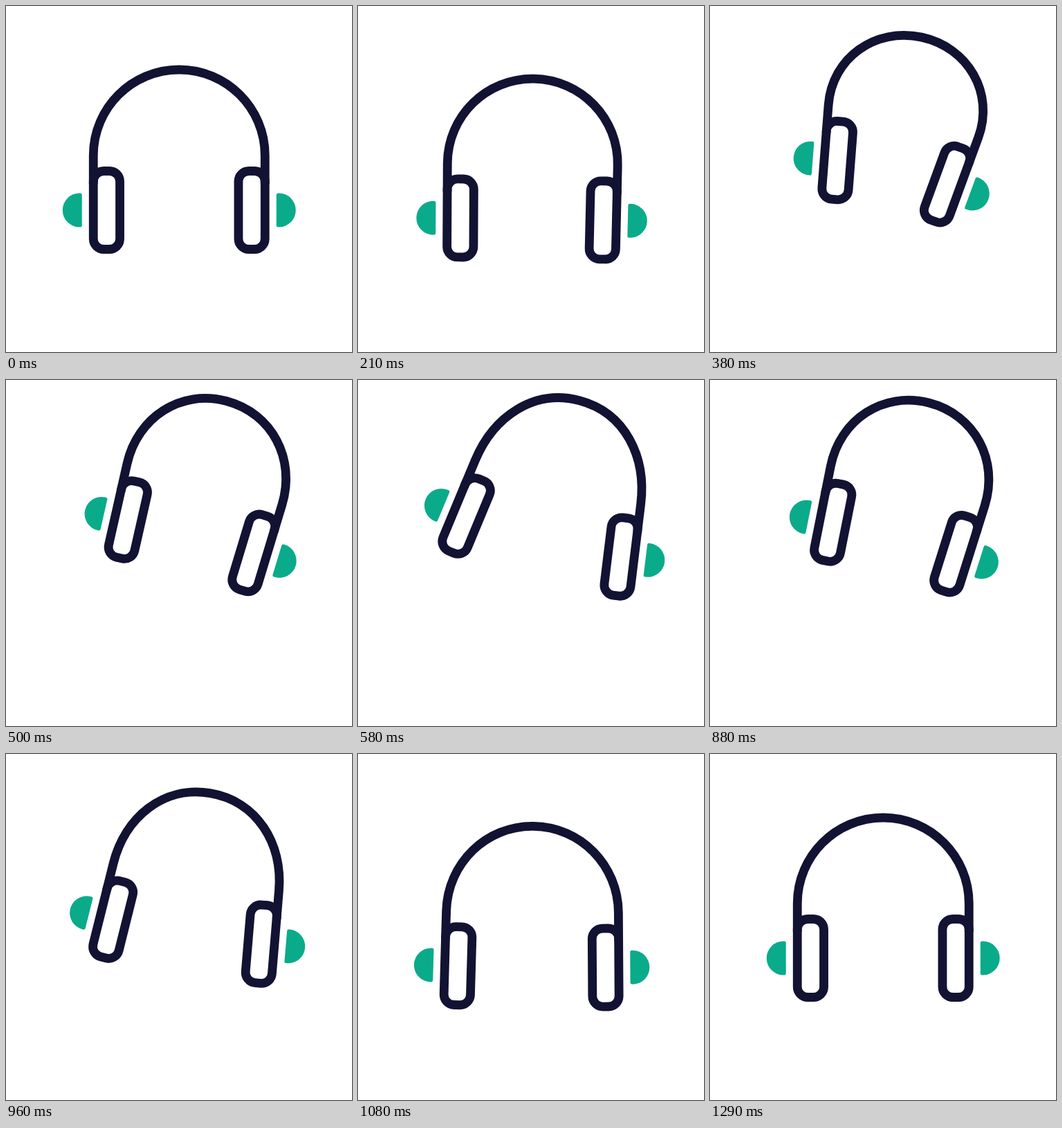
Write an HTML page that moves like this. It is 500 by 500 pixels and loops after 1.33 s.

```html
<!DOCTYPE html>
<html lang="en">
<head>
<meta charset="utf-8">
<title>Headphones</title>
<style>
  html, body { margin: 0; width: 100%; height: 100%; overflow: hidden; background: #fff; }
  svg { display: block; width: 100%; height: 100%; }
  .line { fill: none; stroke: #121233; stroke-width: 12.8; }
  .pad { fill: #0aab8a; }
</style>
</head>
<body>
<svg viewBox="0 0 500 500">
  <defs>
    <g id="cup">
      <rect class="line" x="-19" y="-56.5" width="38.3" height="113" rx="15"/>
      <path class="pad" d="M-39-24.5a24.5 24.5 0 0 0 0 49h1a2.5 2.5 0 0 0 2.5-2.5v-44a2.5 2.5 0 0 0-2.5-2.5z"/>
    </g>
  </defs>
  <g id="body">
    <path id="band" class="line"/>
    <use id="left" href="#cup"/>
    <use id="right" href="#cup"/>
  </g>
</svg>
<script>
const LOOP = 1330, STEP = 1000 / 24;
const HANDLE = 68.5; // quarter-circle handle for the band's 124 radius
const $ = id => document.getElementById(id);
const body = $('body'), band = $('band'), left = $('left'), right = $('right');

// [time in ms, value], joined by sine easing
const HEIGHT = [[0, 295], [175, 311], [449, 226], [845, 226], [1120, 311], [1290, 295]];
const TILT = [[165, 0], [453, 14.8], [845, 14.8], [1120, 0]];
const FLEX = [[170, 0], [410, -8.3], [640, 10.5], [800, -7.5], [990, 5.5], [1120, 0]];

function at(keys, t) {
  if (t <= keys[0][0]) return keys[0][1];
  for (let i = 1; i < keys.length; i++) {
    const [t0, a] = keys[i - 1], [t1, b] = keys[i];
    if (t <= t1) return a + (b - a) * (1 - Math.cos(Math.PI * (t - t0) / (t1 - t0))) / 2;
  }
  return keys[keys.length - 1][1];
}

function draw(t) {
  const tilt = at(TILT, t), flex = at(FLEX, t);
  const x = 250.25 + 1.15 * tilt + 0.13 * flex;
  const half = 105 - 6.5 * Math.min(1, tilt / 9) + 2.2 * flex;
  const top = -203 - 0.4 * Math.min(flex, 0);
  const a = flex * Math.PI / 180, c = Math.cos(a), s = Math.sin(a);

  // point on the outer side of the left cup, in body space
  const side = y => [-half - 19 * c - y * s, -19 * s + y * c];
  const mirror = ([px, py]) => [-px, py];
  const low = side(-38), end = side(-79), grip = side(-79 - HANDLE);

  band.setAttribute('d',
    `M${low}L${end}C${grip} ${[-HANDLE, top]} ${[0, top]}` +
    `C${[HANDLE, top]} ${mirror(grip)} ${mirror(end)}L${mirror(low)}`);
  left.setAttribute('transform', `translate(${-half} 0) rotate(${flex})`);
  right.setAttribute('transform', `scale(-1 1) translate(${-half} 0) rotate(${flex})`);
  body.setAttribute('transform', `translate(${x} ${at(HEIGHT, t)}) rotate(${tilt})`);
}

const start = performance.now();
function tick() {
  const t = (performance.now() - start) % LOOP;
  draw(Math.floor((t + 3.4) / STEP) * STEP);
  requestAnimationFrame(tick);
}
tick();
</script>
</body>
</html>
```
